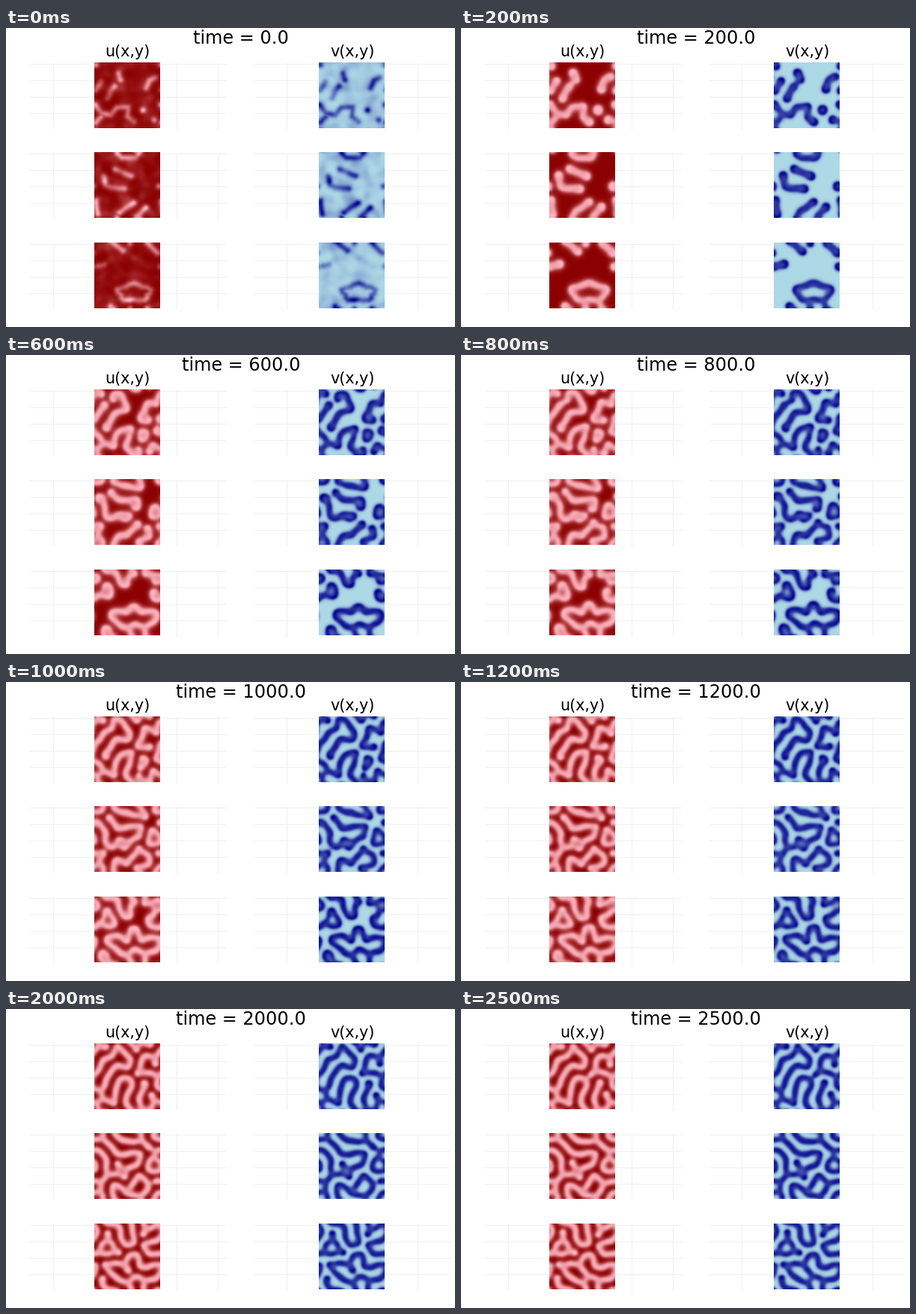
Recreate the animation shown at these times as a matplotlib script. Size 600 px wide and 400 px high, loop 2.6 s.

```python
import numpy as np
import matplotlib.pyplot as plt
from matplotlib.animation import FuncAnimation
from matplotlib.colors import LinearSegmentedColormap

# Gray-Scott reaction-diffusion: three runs, u on the left, v on the right
N, SIDE = 64, 88
FRAMES, SAVE_EVERY = 26, 100
DU, DV, FEED, KILL = 0.16, 0.08, 0.055, 0.062
TOPS = (47, 167, 288)


def ring(cx, cy, rx, ry, ripple):
    """Closed loop with a scalloped edge."""
    angles = np.linspace(0, 2 * np.pi, 21)
    scale = 1 - ripple * np.cos(5 * angles - np.pi / 2)
    return list(zip(cx + rx * scale * np.cos(angles),
                    cy + ry * scale * np.sin(angles)))


# Worms that start each run, in panel pixels
SEEDS = [
    [[(2, 4)], [(32, 15), (35, 23)], [(18, 48), (22, 38), (27, 32)],
     [(2, 37), (9, 26)], [(70, 35), (74, 24), (82, 20)],
     [(1, 57), (10, 68), (22, 70), (30, 61), (45, 60), (45, 72), (53, 79)],
     [(2, 80), (9, 73)], [(65, 64)], [(80, 77)]],
    [[(31, 1), (37, 7), (55, 7), (60, 0)], [(28, 23), (49, 32)],
     [(13, 32), (15, 45), (22, 48), (40, 49)], [(86, 46)],
     [(2, 65), (4, 83)], [(35, 81), (53, 68)], [(56, 87), (69, 74)]],
    [[(25, 0), (38, 11)], [(48, 0)], [(70, 0), (85, 14)],
     [(5, 31), (13, 29)], [(88, 32)], [(22, 86)],
     ring(53, 67, 21, 11, 0.12)],
]

axis_px = (np.arange(N) + 0.5) * SIDE / N
GX, GY = np.meshgrid(axis_px, axis_px)


def distance(lines):
    """Distance from every cell to the polylines on the periodic square."""
    best = np.full((N, N), 1e9)
    for line in lines:
        for (ax, ay), (bx, by) in zip(line, line[1:] or line):
            dx, dy = bx - ax, by - ay
            length2 = max(dx * dx + dy * dy, 1e-9)
            for sx in (-SIDE, 0, SIDE):
                for sy in (-SIDE, 0, SIDE):
                    px, py = GX + sx - ax, GY + sy - ay
                    s = np.clip((px * dx + py * dy) / length2, 0, 1)
                    best = np.minimum(best, np.hypot(px - s * dx, py - s * dy))
    return best


def bump(dist, width):
    return np.exp(-(dist / width) ** 2)


def laplacian(a):
    return (np.roll(a, 1, 1) + np.roll(a, -1, 1)
            + np.roll(a, 1, 2) + np.roll(a, -1, 2) - 4 * a)


def smooth_noise(rng):
    n = rng.standard_normal((3, N, N))
    for _ in range(24):
        n = n + 0.2 * laplacian(n)
    lo = n.min(axis=(1, 2), keepdims=True)
    hi = n.max(axis=(1, 2), keepdims=True)
    return (n - lo) / (hi - lo)


def advance(u, v, steps):
    for _ in range(steps):
        reaction = u * v * v
        u, v = (u + DU * laplacian(u) - reaction + FEED * (1 - u),
                v + DV * laplacian(v) + reaction - (FEED + KILL) * v)
    return u, v


def simulate():
    seed = np.array([distance(lines) for lines in SEEDS])
    noise = smooth_noise(np.random.default_rng(4))
    v0 = bump(seed, 4.2) * (0.3 + 0.7 * noise) + 0.3 * noise ** 2
    states = [(1 - v0, v0)]

    u, v = 1 - 0.56 * bump(seed, 6), 0.35 * bump(seed, 5)
    u, v = advance(u, v, SAVE_EVERY // 2)
    states.append((u, v))
    while len(states) < FRAMES:
        u, v = advance(u, v, SAVE_EVERY)
        states.append((u, v))
    return states


states = simulate()

fig = plt.figure(figsize=(6, 4), dpi=100, facecolor="white")
ax = fig.add_axes([0, 0, 1, 1])
ax.axis("off")

reds = LinearSegmentedColormap.from_list("reds", ["lightpink", "darkred"])
blues = LinearSegmentedColormap.from_list("blues", ["lightblue", "darkblue"])
COLUMNS = [  # image left, grid start, grid end, vertical grid lines, colours
    (118, 32, 294, (62, 227, 282), reds),
    (418, 332, 592, (374, 549), blues),
]

images = []
for field, (left, start, end, verticals, cmap) in enumerate(COLUMNS):
    for run, top in enumerate(TOPS):
        grid = dict(color="#f0f0f0", lw=0.72, zorder=1)
        for k in range(4):
            y = top + 0.5 + 22 * k
            ax.plot([start, end], [y, y], **grid)
        for x in verticals:
            ax.plot([x + 0.5, x + 0.5], [top, top + 87.5], **grid)
        image = ax.imshow(states[0][field][run], cmap=cmap, aspect="auto",
                          extent=(left, left + SIDE, top + 87.5, top),
                          interpolation="bilinear", zorder=2)
        images.append((image, field, run))
ax.set_xlim(0, 600)
ax.set_ylim(400, 0)


def label(x, y, text, px):
    return ax.text(x, y, text, fontsize=px * 0.72, family="DejaVu Sans",
                   ha="center", va="baseline", color="black")


label(162.5, 38, "u(x,y)", 20.8)
label(463, 38, "v(x,y)", 20.8)
title = label(314, 21, "", 24)


def draw(frame):
    title.set_text(f"time = {frame * SAVE_EVERY:.1f}")
    for image, field, run in images:
        data = states[frame][field][run]
        image.set_data(data)
        image.set_clim(data.min(), data.max())
    return [title] + [item[0] for item in images]


anim = FuncAnimation(fig, draw, frames=FRAMES, interval=100, repeat=True)
plt.show()
```
